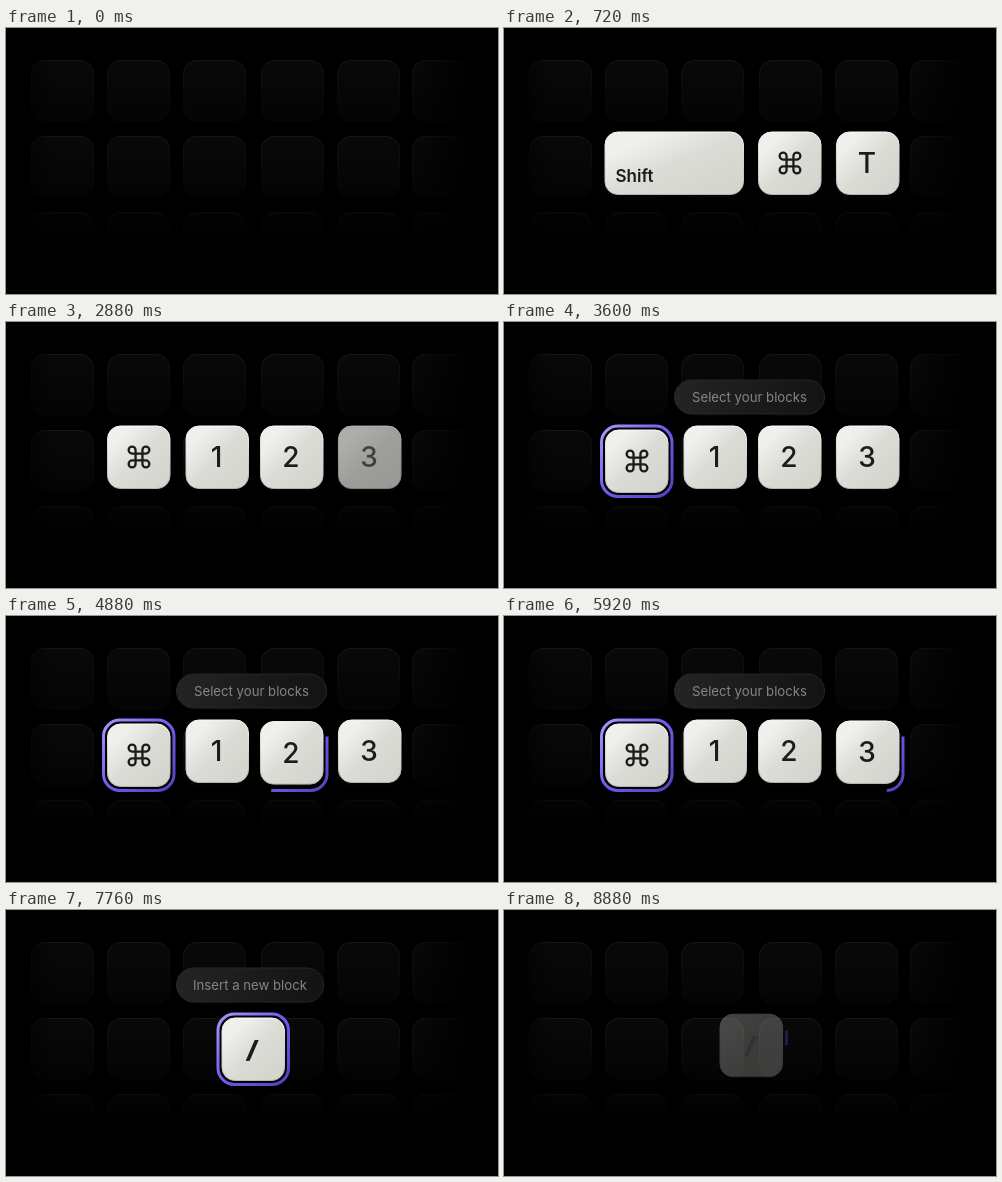
Animation, 492 px wide and 266 px high, one loop 8.96 s. Source, as an HTML page:

```html
<!DOCTYPE html>
<html lang="en">
<head>
<meta charset="utf-8">
<style>
  html, body { margin: 0; width: 100%; height: 100%; overflow: hidden; background: #000; }
  svg { display: block; width: 492px; height: 266px; }
  text { font-family: Inter, sans-serif; fill: #1b1b1b; }
  .glyph { font-size: 28px; font-weight: 500; text-anchor: middle; }
  .slash { font-size: 24px; font-weight: 900; font-style: italic; text-anchor: middle; }
  .word { font-size: 17px; font-weight: 600; }
  .tip { font-size: 13.2px; text-anchor: middle; fill: #858585; }
</style>
</head>
<body>
<svg id="stage" viewBox="0 0 492 266">
  <defs>
    <linearGradient id="cap" x2="1" y2="1">
      <stop stop-color="#f0f0ed"/><stop offset=".2" stop-color="#efefec"/>
      <stop offset=".5" stop-color="#dcdcd7"/><stop offset="1" stop-color="#d3d3cd"/>
    </linearGradient>
    <linearGradient id="rim" x2="0" y2="1">
      <stop stop-color="#fafaf8"/><stop offset=".3" stop-color="#dededa"/><stop offset="1" stop-color="#b5b5af"/>
    </linearGradient>
    <linearGradient id="glow" x2="1" y2="1">
      <stop stop-color="#a497ff"/><stop offset=".5" stop-color="#7458f0"/><stop offset="1" stop-color="#5440c0"/>
    </linearGradient>
    <linearGradient id="pill" x2="1" y2="0">
      <stop stop-color="#242424"/><stop offset="1" stop-color="#131313"/>
    </linearGradient>
    <linearGradient id="tile" x2="0" y2="1">
      <stop stop-color="#090909"/><stop offset="1" stop-color="#040404"/>
    </linearGradient>
    <linearGradient id="tileRim" x2="0" y2="1">
      <stop stop-color="#161616"/><stop offset=".5" stop-color="#0a0a0a"/><stop offset="1" stop-color="#050505"/>
    </linearGradient>
    <linearGradient id="sides" x2="1" y2="0">
      <stop/><stop offset=".1" stop-opacity="0"/>
      <stop offset=".82" stop-opacity="0"/><stop offset=".95"/>
    </linearGradient>
    <linearGradient id="floor" x2="0" y2="1">
      <stop offset=".58" stop-opacity="0"/><stop offset=".8"/>
    </linearGradient>
  </defs>
</svg>
<script>
const LOOP = 8960, STEP = 80, DRAW = 440, HOLD = 560;
const KEY = 63.5, TOP = 103.5, PRESS = 4;
const CMD = 'M18 3a3 3 0 0 0-3 3v12a3 3 0 1 0 3-3H6a3 3 0 1 0 3 3V6a3 3 0 1 0-3 3h12a3 3 0 0 0 0-6z';
const stage = document.getElementById('stage');

// tip: [text, x, width, time shown]; keys: [label, x, press time, released early]
const scenes = [
  { start: 120, fade: 400, stagger: 100, end: 2440, out: 280,
    tip: ['Tidy up and organise all blocks', 137, 218, 1320],
    keys: [['Shift', 100.5, 920], ['⌘', 254, 1400], ['T', 332, 1880]] },
  { start: 2440, fade: 280, stagger: 80, end: 6520, out: 280,
    tip: ['Select your blocks', 170, 151, 3240],
    keys: [['⌘', 101, 2920], ['1', 179.5, 3740, true], ['2', 254, 4810, true], ['3', 332, 5880]] },
  { start: 6520, fade: 280, stagger: 0, end: 8610, out: 370,
    tip: ['Insert a new block', 170, 148, 7400],
    keys: [['/', 215.5, 7000]] }
];

function add(parent, tag, attrs = {}, text = '') {
  const node = document.createElementNS('http://www.w3.org/2000/svg', tag);
  for (const name in attrs) node.setAttribute(name, attrs[name]);
  node.textContent = text;
  return parent.appendChild(node);
}
const progress = (t, start, length) => Math.min(1, Math.max(0, (t - start) / length));
const easeOut = p => 1 - (1 - p) ** 3;

function ringPath(x, w) {
  const r = 16.5, l = x - 3.5, t = TOP + PRESS - 3.5, R = x + w + 3.5, b = TOP + PRESS + KEY + 3.5;
  const arc = (x, y) => `A${r} ${r} 0 0 1 ${x} ${y}`;
  return `M${R} ${t + r}V${b - r}${arc(R - r, b)}H${l + r}${arc(l, b - r)}` +
         `V${t + r}${arc(l + r, t)}H${R - r}${arc(R, t + r)}`;
}

function buildKey(parent, [label, x, press, released], end) {
  const w = label === 'Shift' ? 139.5 : KEY, mid = x + 31;
  const ring = add(parent, 'path',
    { d: ringPath(x, w), pathLength: 1, fill: 'none', stroke: 'url(#glow)', 'stroke-width': 3 });
  const cap = add(parent, 'g');
  add(cap, 'rect', { x: x + .5, y: TOP + .5, width: w - 1, height: KEY - 1, rx: 13,
    fill: 'url(#cap)', stroke: 'url(#rim)' });
  if (label === '⌘') {
    add(cap, 'path', { d: CMD, transform: `translate(${mid + 1} 135) scale(1.15) translate(-12 -12)`,
      fill: 'none', stroke: '#1b1b1b', 'stroke-width': 2 });
  } else if (label === 'Shift') {
    add(cap, 'text', { x: x + 11, y: 153.5, class: 'word' }, label);
  } else if (label === '/') {
    add(cap, 'text', { x: mid - .5, y: 143.5, class: 'slash' }, label);
  } else {
    add(cap, 'text', { x: mid, y: 145, class: 'glyph' }, label);
  }
  return { ring, cap, press, release: released ? press + HOLD : end };
}

function buildScene(scene) {
  const group = add(stage, 'g');
  const [text, x, width, shown] = scene.tip;
  const tip = add(group, 'g');
  add(tip, 'rect', { x: x + .5, y: 58, width: width - 1, height: 34, rx: 17,
    fill: 'url(#pill)', stroke: '#262626' });
  add(tip, 'text', { x: x + width / 2, y: 80, class: 'tip' }, text);
  return { ...scene, group, tip, shown, keys: scene.keys.map(key => buildKey(group, key, scene.end)) };
}

for (const y of [32, 108, 184])
  for (const x of [25, 101, 177, 255, 331, 406])
    add(stage, 'rect', { x: x + .5, y: y + .5, width: 62, height: 61, rx: 13,
      fill: 'url(#tile)', stroke: 'url(#tileRim)' });
for (const shade of ['sides', 'floor'])
  add(stage, 'rect', { width: 492, height: 266, fill: `url(#${shade})` });
const built = scenes.map(buildScene);

function render(t) {
  for (const s of built) {
    const visible = t >= s.start && t < s.end + s.out;
    s.group.style.display = visible ? '' : 'none';
    if (!visible) continue;
    const left = 1 - progress(t, s.end, s.out);
    s.tip.setAttribute('opacity', progress(t, s.shown, 360) * (1 - progress(t, s.end, 240)));
    s.keys.forEach((key, i) => {
      const shown = progress(t, s.start + i * s.stagger, s.fade);
      const drawn = easeOut(progress(t, key.press, DRAW)) - easeOut(progress(t, key.release, DRAW));
      const drop = PRESS * (drawn + 1 - easeOut(shown));
      key.cap.setAttribute('transform', `translate(0 ${drop})`);
      for (const part of key.cap.children) part.setAttribute('opacity', shown * left);
      key.ring.style.display = drawn > 0 ? '' : 'none';
      key.ring.setAttribute('opacity', left);
      key.ring.setAttribute('stroke-dasharray', `${drawn} 2`);
    });
  }
}

const began = performance.now();
function tick() {
  const t = (performance.now() - began) % LOOP;
  render(Math.floor(t / STEP) * STEP);
  requestAnimationFrame(tick);
}
tick();
</script>
</body>
</html>
```
